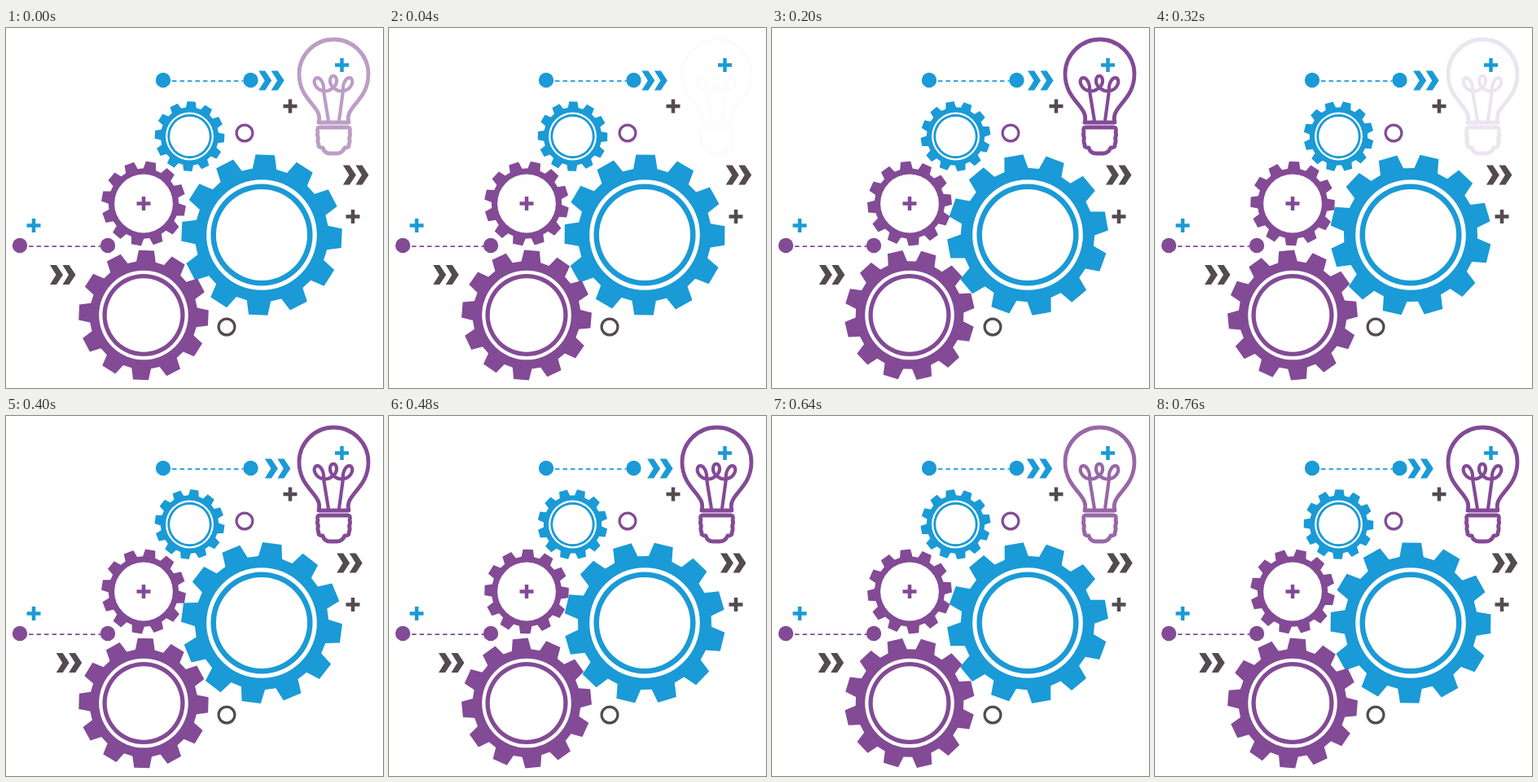
An HTML page with a canvas that plays this animation: 463 px wide and 442 px high, repeating every 0.8 s.

```html
<!DOCTYPE html>
<html lang="en">
<head>
<meta charset="utf-8">
<title>Gears and bulb</title>
<style>
  html, body { margin: 0; width: 100%; height: 100%; overflow: hidden; background: #fff; }
  canvas { display: block; }
</style>
</head>
<body>
<canvas id="stage" width="463" height="442"></canvas>
<script>
const ctx = document.getElementById('stage').getContext('2d');
const BLUE = '#1a9ad6', PURPLE = '#834a96', DARK = '#544a52', WHITE = '#fff';
const LOOP = 800, TAU = Math.PI * 2, DEG = Math.PI / 180;

const glass = new Path2D('M384 116H421C420 112 420 109 421 106C425 93 445 84 445 56.5' +
  'A42.5 42.5 0 0 0 360 56.5C360 84 380 93 384 106C385 109 385 112 384 116Z');
const cap = new Path2D('M386 122H419Q424 122 422 128Q423.5 131 421.5 135Q423 139 421 143' +
  'Q422 147 416 147Q413 154 406 154H398Q391 154 389 147Q383 147 384 143' +
  'Q382 139 383.5 135Q381.5 131 383 128Q381 122 386 122Z');
const filament = new Path2D('M396 114L390 77C382 77 376 67 380 62C386 58 391 69 390 77' +
  'C396 79 407 72 406 64C405 57 399 57 398 64C397 72 408 79 414 77' +
  'C413 69 418 58 424 62C428 67 422 77 414 77L409 114');

function disc(x, y, r, color) {
  ctx.fillStyle = color;
  ctx.beginPath();
  ctx.arc(x, y, r, 0, TAU);
  ctx.fill();
}

function ring(x, y, r, color) {
  disc(x, y, r + 1.6, color);
  disc(x, y, r - 1.6, WHITE);
}

function plus(x, y, color) {
  ctx.fillStyle = color;
  ctx.fillRect(x - 8.5, y - 2.25, 17, 4.5);
  ctx.fillRect(x - 2.25, y - 8.5, 4.5, 17);
}

// Discs are radii relative to the tip radius, alternating white and the gear colour.
function gear(x, y, size, angle, color, discs = [0.685, 0.632, 0.566]) {
  ctx.fillStyle = color;
  ctx.beginPath();
  for (let tooth = 0; tooth < 12; tooth++) {
    for (const [offset, r] of [[-10.3, 0.83], [-6.8, 1], [6.8, 1], [10.3, 0.83]]) {
      const a = (tooth * 30 + angle + offset) * DEG;
      ctx.lineTo(x + size * r * Math.sin(a), y - size * r * Math.cos(a));
    }
  }
  ctx.fill();
  discs.forEach((r, i) => disc(x, y, size * r, i % 2 ? color : WHITE));
}

function chevrons(x, y, color) {
  ctx.fillStyle = color;
  for (const left of [x, x + 15.5]) {
    ctx.beginPath();
    for (const [dx, dy] of [[0, -12], [8, -12], [16, 0], [8, 12], [0, 12], [7.5, 0]]) {
      ctx.lineTo(left + dx, y + dy);
    }
    ctx.fill();
  }
}

function connector(x1, x2, y, color) {
  disc(x1, y, 9.2, color);
  disc(x2, y, 9.2, color);
  ctx.strokeStyle = color;
  ctx.lineWidth = 1.8;
  ctx.setLineDash([5.5, 4]);
  ctx.beginPath();
  ctx.moveTo(x1 + 11, y + 1.2);
  ctx.lineTo(x2 - 9, y + 1.2);
  ctx.stroke();
  ctx.setLineDash([]);
}

function bulb(alpha) {
  ctx.strokeStyle = `rgb(${[131, 74, 150].map(c => 255 + (c - 255) * alpha)})`;
  ctx.lineJoin = 'round';
  ctx.lineWidth = 4.2;
  ctx.stroke(filament);
  ctx.lineWidth = 4.8;
  ctx.stroke(glass);
  ctx.stroke(cap);
}

function draw(time) {
  const phase = time / LOOP * TAU;
  const wave = 1 - Math.cos(phase);
  const swing = wave + 0.36 * (1 - Math.cos(3 * phase));
  const blueTurn = -9.2 * swing, purpleTurn = 10.7 * swing;
  const shift = 3.85 * wave;
  const blink = time * 3 / LOOP % 1;
  const gap = Math.abs((blink + 0.34) % 1 - 0.5);

  ctx.fillStyle = WHITE;
  ctx.fillRect(0, 0, 463, 442);

  bulb(Math.min(1, gap / 0.29));
  connector(193, 300.5, 64, BLUE);
  connector(17, 125, 267, PURPLE);

  gear(314, 254, 99, 2.5 + blueTurn, BLUE);
  gear(225.5, 133, 43, 3 + blueTurn, BLUE);
  gear(169, 352.5, 80, 2.5 + purpleTurn, PURPLE);
  gear(169, 215.5, 52, 10 + purpleTurn, PURPLE, [0.69]);

  ring(293, 129, 9.9, PURPLE);
  ring(271, 367, 9.9, DARK);
  plus(412.5, 45.5, BLUE);
  plus(34, 242.5, BLUE);
  plus(169, 215.5, PURPLE);
  plus(349, 96, DARK);
  plus(426, 231.5, DARK);

  chevrons(310.2 + shift, 64.5, BLUE);
  chevrons(54 + shift, 303, DARK);
  chevrons(413.9 - shift, 180.5, DARK);
}

function loop() {
  draw(performance.now() % LOOP);
  requestAnimationFrame(loop);
}
loop();
</script>
</body>
</html>
```
